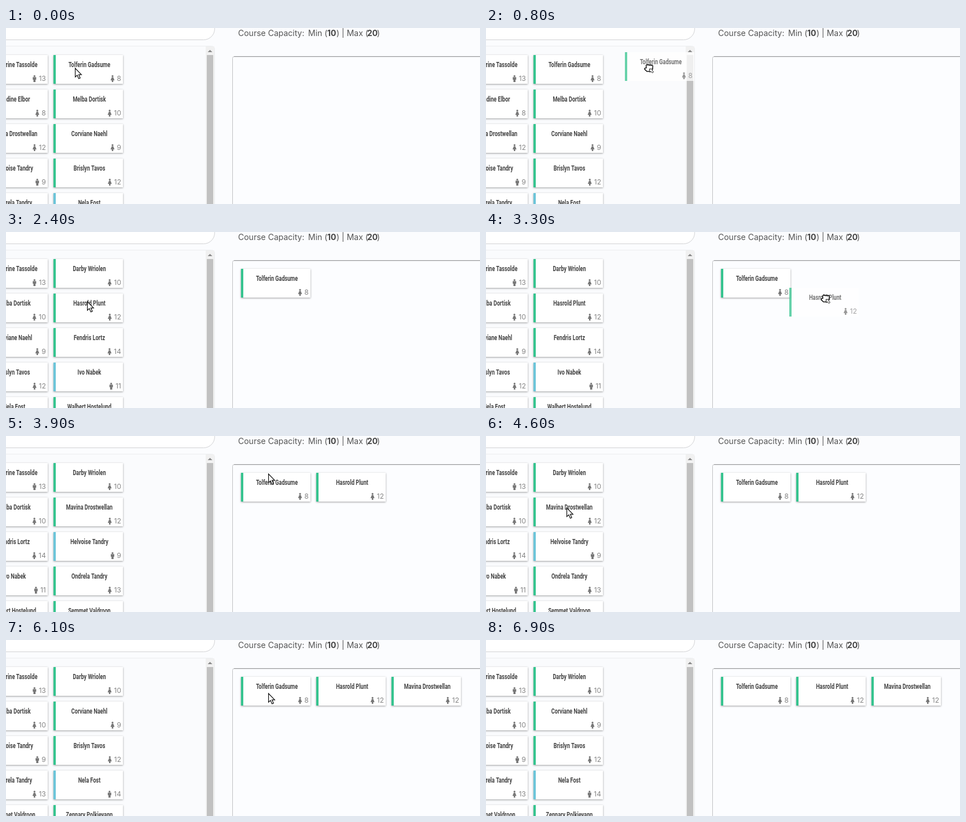
Animation, 819 px wide and 306 px high, one loop 7.3 s. Source, as an HTML page with a canvas:

```html
<!DOCTYPE html>
<html lang="en">
<head>
<meta charset="utf-8">
<title>Course planner</title>
<style>
html, body { margin: 0; width: 100%; height: 100%; overflow: hidden; background: #fbfcfe; }
canvas { display: block; width: 819px; height: 306px; }
</style>
</head>
<body>
<canvas id="stage"></canvas>
<script>
const W = 819, H = 306, LOOP = 7300, STEP = 100;
const canvas = document.getElementById('stage');
const ratio = window.devicePixelRatio || 1;
canvas.width = W * ratio;
canvas.height = H * ratio;
const ctx = canvas.getContext('2d');

const GREEN = '#36c48f', BLUE = '#6cc5d9';
const NAME_FONT = 'bold 13px Roboto, "Liberation Sans", sans-serif';
const CONDENSE = 0.7;

// name, score, 'm' or 'f', accent
const people = {
  tass: ['Belmarine Tassolde', 13, 'm', GREEN],
  elb: ['Oradine Elbor', 8, 'f', GREEN],
  mav: ['Mavina Drostwellan', 12, 'f', GREEN],
  helv: ['Helvoise Tandry', 9, 'm', BLUE],
  ond: ['Ondrela Tandry', 13, 'f', GREEN],
  tol: ['Tolferin Gadsume', 8, 'f', GREEN],
  melb: ['Melba Dortisk', 10, 'f', GREEN],
  corv: ['Corviane Naehl', 9, 'f', GREEN],
  bris: ['Brislyn Tavos', 12, 'f', GREEN],
  nela: ['Nela Fost', 14, 'm', BLUE],
  darb: ['Darby Wriolen', 10, 'f', GREEN],
  hasr: ['Hasrold Plunt', 12, 'f', GREEN],
  fend: ['Fendris Lortz', 14, 'f', GREEN],
  ivo: ['Ivo Nabek', 11, 'm', BLUE],
  walb: ['Walbert Hostelund', 10, 'f', GREEN],
  semm: ['Semmet Valdroon', 9, 'f', GREEN],
  zenn: ['Zennary Polkievann', 11, 'f', GREEN]
};

// Two visible columns of the pool after each drop
const pools = [
  ['tass elb mav helv ond', 'tol melb corv bris nela'],
  ['tass melb corv bris nela', 'darb hasr fend ivo walb'],
  ['tass melb fend ivo walb', 'darb mav helv ond semm'],
  ['tass melb helv ond semm', 'darb corv bris nela zenn']
].map(cols => cols.map(c => c.split(' ')));

// Drags: id, start, drop time, grab offset, ghost path [t, x, y]
const drags = [
  { id: 'tol', start: 500, drop: 1400, grab: [37, 22],
    path: [[500, 119, 45], [800, 240, 42], [1000, 340, 53], [1200, 397, 70], [1300, 406, 72]] },
  { id: 'hasr', start: 2700, drop: 3600, grab: [58, 13],
    path: [[2700, 140, 100], [2900, 270, 95], [3100, 430, 94], [3300, 524, 97], [3400, 532, 98], [3500, 553, 97]] },
  { id: 'mav', start: 4800, drop: 5700, grab: [57, 17],
    path: [[4800, 145, 95], [5000, 270, 88], [5200, 375, 83], [5400, 422, 82]] }
];

// Pointer path between drags
const pointer = [
  [0, 119, 69], [499, 119, 69],
  [1400, 443, 95], [1600, 365, 101], [1800, 250, 111], [2000, 178, 115],
  [2200, 149, 118], [2400, 140, 120], [2699, 140, 120],
  [3600, 611, 108], [3800, 530, 48], [4000, 375, 82], [4200, 234, 118],
  [4400, 165, 121], [4600, 139, 124], [4799, 139, 124],
  [5700, 480, 96], [6000, 480, 96], [6200, 425, 88], [6400, 300, 62],
  [6600, 170, 22], [6800, 75, -17], [6900, 70, -40]
];

function along(path, t) {
  let i = 1;
  while (i < path.length - 1 && t > path[i][0]) i++;
  const a = path[i - 1], b = path[i];
  const k = Math.min(1, Math.max(0, (t - a[0]) / (b[0] - a[0])));
  return [a[1] + (b[1] - a[1]) * k, a[2] + (b[2] - a[2]) * k].map(Math.round);
}

function rect(x, y, w, h, color) {
  ctx.fillStyle = color;
  ctx.fillRect(x, y, w, h);
}

function poly(points, fill, stroke) {
  ctx.beginPath();
  points.forEach(([x, y]) => ctx.lineTo(x, y));
  ctx.closePath();
  ctx.fillStyle = fill;
  ctx.fill();
  if (stroke) {
    ctx.strokeStyle = stroke;
    ctx.stroke();
  }
}

function text(s, x, y, font, color, align = 'left') {
  ctx.font = font;
  ctx.fillStyle = color;
  ctx.textAlign = align;
  ctx.fillText(s, x, y);
}

function person(x, y, kind) {
  ctx.fillStyle = '#777';
  ctx.beginPath();
  ctx.arc(x, y + 1.6, 1.6, 0, 7);
  ctx.fill();
  if (kind === 'm') {
    ctx.fillRect(x - 3, y + 3.4, 6, 4.4);
    ctx.fillRect(x - 1.8, y + 7, 3.6, 5);
  } else {
    poly([[x - 1.3, y + 3.4], [x + 1.3, y + 3.4], [x + 3.4, y + 9], [x - 3.4, y + 9]], '#777');
    ctx.fillRect(x - 1.3, y + 9, 2.6, 3);
  }
}

function card(id, x, y, ghost) {
  const [name, score, kind, accent] = people[id];
  ctx.save();
  if (ghost) {
    ctx.globalAlpha = 0.75;
  } else {
    ctx.save();
    ctx.shadowColor = 'rgba(0,0,0,.38)';
    ctx.shadowBlur = 3 * ratio;
    ctx.shadowOffsetY = ratio;
    rect(x, y, 120, 50, '#fff');
    ctx.restore();
  }
  rect(x + 4, y, 116, 50, '#fff');
  rect(x, y, 4, 50, accent);
  ctx.save();
  ctx.translate(x + 62, y + 21);
  ctx.scale(CONDENSE, 1);
  text(name, 0, 0, NAME_FONT, '#444', 'center');
  ctx.restore();
  text(score, x + 117, y + 45, '12px Inter, "Open Sans", sans-serif', '#858585', 'right');
  person(x + 109.5 - ctx.measureText(score).width, y + 35, kind);
  ctx.restore();
}

function arrow(x, y) {
  ctx.lineWidth = 1.2;
  ctx.lineJoin = 'miter';
  poly([[0.6, 1], [0.6, 16.2], [4, 13], [6.6, 19], [9.2, 17.9], [6.7, 12.1], [11.3, 12.1]]
    .map(([a, b]) => [x + a, y + b]), '#fff', '#111');
}

function fist(x, y) {
  ctx.save();
  ctx.translate(x - 4, y - 2);
  ctx.lineWidth = 1.5;
  ctx.lineJoin = 'round';
  ctx.beginPath();
  ctx.moveTo(4, 7.5);
  ctx.lineTo(3.6, 3.4);
  for (let i = 0; i < 4; i++) {
    const a = 3.6 + i * 2.9;
    ctx.quadraticCurveTo(a + 1.3, 0.2 + i * 0.3, a + 2.9, 2.6 + i * 0.4);
  }
  ctx.lineTo(15, 8);
  ctx.lineTo(13, 13.5);
  ctx.lineTo(5, 13.5);
  ctx.lineTo(1, 9.6);
  ctx.quadraticCurveTo(0.6, 7, 4, 7.5);
  ctx.closePath();
  ctx.fillStyle = '#fff';
  ctx.strokeStyle = '#111';
  ctx.fill();
  ctx.stroke();
  ctx.lineWidth = 1;
  poly([[9.5, 9], [15.5, 9.5], [13.8, 11.4], [16.4, 14.2], [14.6, 16.2], [12, 13.4], [10, 15]], '#fff', '#111');
  ctx.restore();
}

function box(x, y, w, h, r, fill, stroke) {
  ctx.beginPath();
  ctx.roundRect(x, y, w, h, r);
  ctx.fillStyle = fill;
  ctx.fill();
  ctx.strokeStyle = stroke;
  ctx.lineWidth = 1;
  ctx.stroke();
}

function page() {
  rect(0, 0, W, H, '#fbfcfe');
  box(-60.5, -40.5, 421, 61, 19, '#fff', '#d2d3d5');
  box(-10.5, 31.5, 371, 300, 5, '#fafbfd', '#eceef0');
  rect(345, 32, 15, 274, '#f1f1f1');
  rect(347, 47, 11, 259, '#c1c1c1');
  poly([[348.5, 42], [352.5, 38], [356.5, 42]], '#8a8a8a');
  box(391.5, 49.5, 500, 300, 3, '#fcfdff', '#c2c3c5');
  rect(394, 49, 425, 1, '#97989a');
  rect(393, 50, 426, 1, '#e6e7e9');

  const plain = '14px Inter, "Open Sans", sans-serif';
  [['Course Capacity:', 401], ['Min (', 522], ['10', 555, 1], [') | Max (', 571],
   ['20', 624, 1], [')', 641]].forEach(([s, x, bold]) =>
    text(s, x, 14, (bold ? 'bold ' : '') + plain, bold ? '#444' : '#555'));
}

function draw(t) {
  ctx.setTransform(ratio, 0, 0, ratio, 0, 0);
  page();
  const done = drags.filter(d => t >= d.drop).length;
  pools[done].forEach((ids, col) =>
    ids.forEach((id, row) => card(id, -48 + col * 130, 47 + row * 60)));
  drags.slice(0, done).forEach((d, i) => card(d.id, 406 + i * 130, 64));

  const active = drags.find(d => t >= d.start && t < d.drop);
  if (active) {
    const [x, y] = along(active.path, t);
    card(active.id, x, y, true);
    fist(x + active.grab[0], y + active.grab[1]);
  } else {
    arrow(...along(pointer, t));
  }
}

function tick() {
  const t = performance.now() % LOOP;
  draw(Math.floor(t / STEP) * STEP);
  requestAnimationFrame(tick);
}
tick();
</script>
</body>
</html>
```
